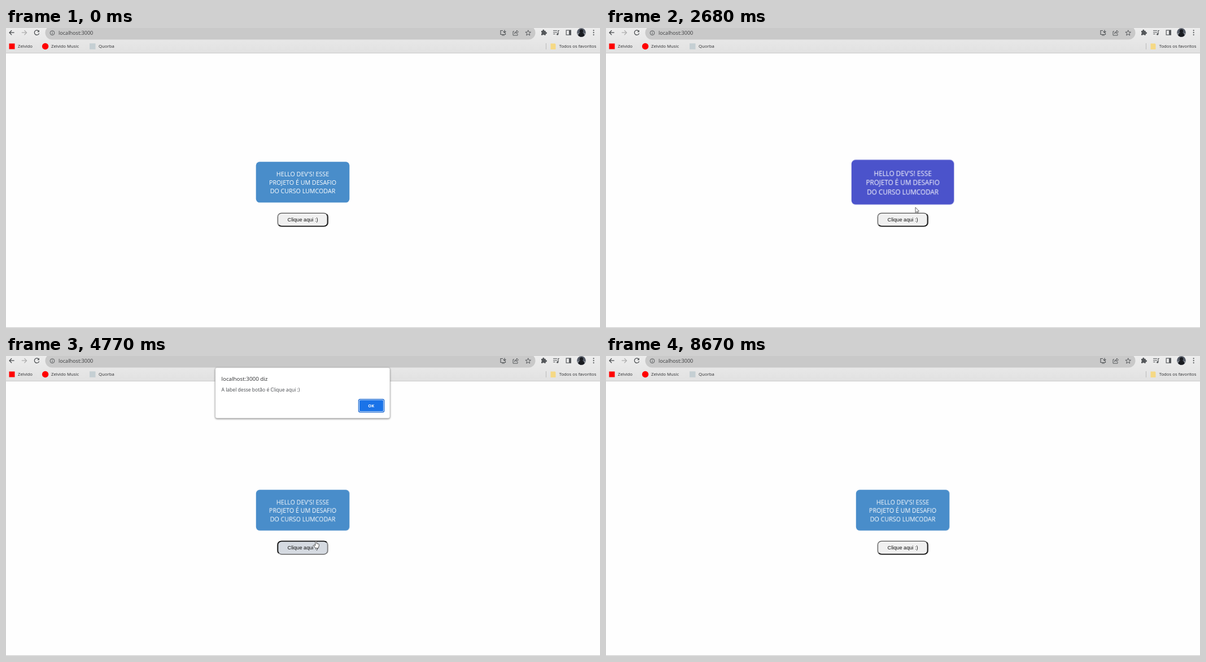
An HTML page for the animation above (9.62 s loop, 1052 by 532 pixels).

```html
<!DOCTYPE html>
<html lang="pt-BR">
<head>
<meta charset="utf-8">
<title>Clique aqui</title>
<style>
  html, body { margin: 0; width: 100%; height: 100%; overflow: hidden; background: #fefefe; }
  svg { display: block; width: 100%; height: 100%; }
  text { font-family: "Open Sans", "Noto Sans", sans-serif; fill: #2b2c2e; }

  .icon { fill: none; stroke: #55585b; stroke-width: 1.2; }
  .solid { fill: #55585b; stroke: none; }
  .bookmark { font-size: 7.75px; }
  .url { font-size: 9.1px; fill: #3b3c3e; }

  .card text { font-size: 10.7px; fill: #fff; text-anchor: middle; }
  .button text { font: 9.17px "Liberation Sans", Arial, sans-serif; fill: #111; text-anchor: middle; }
  .title { font-size: 9.84px; }
  .message { font-size: 8.59px; fill: #45484c; }
  .ok { font-size: 7.4px; font-weight: 700; fill: #fff; text-anchor: middle; }
  .box { filter: drop-shadow(0 1px 1.6px rgba(0, 0, 0, .5)); }

  /* Every animation shares one 9.62 s loop. */
  .card, .card rect, .face, .edge, .dialog, .ring, .pointer, .arrow, .beam, .hand, .spot {
    animation: 9.62s linear infinite;
  }
  .card { transform-origin: 525.5px 273.4px; animation-name: grow; }
  .card rect { animation-name: tint; }
  .face { animation-name: face; }
  .edge { animation-name: press; animation-timing-function: step-end; }
  .dialog { animation-name: dialog; }
  .ring { animation-name: ring; animation-timing-function: step-end; }
  .pointer { animation-name: travel; }
  .arrow { animation-name: arrow; animation-timing-function: step-end; }
  .beam { animation-name: beam; animation-timing-function: step-end; }
  .hand { animation-name: hand; animation-timing-function: step-end; }
  .spot { animation-name: spot; animation-timing-function: step-end; }

  @keyframes grow {
    0%, 30.3%, 100% { transform: scale(1); }
    13.88% { transform: scale(1); animation-timing-function: ease; }
    16.48% { transform: scale(1.1); }
    27.75% { transform: scale(1.1); animation-timing-function: ease; }
  }
  @keyframes tint {
    0%, 30.3%, 100% { fill: #498dca; }
    13.88% { fill: #498dca; animation-timing-function: ease; }
    16.48% { fill: #4b51cb; }
    27.75% { fill: #4b51cb; animation-timing-function: ease; }
  }
  @keyframes face {
    0%, 29.9% { fill: #f0f0f0; }
    33.06%, 65.8% { fill: #d5dae1; }
    68.9%, 100% { fill: #f0f0f0; }
  }
  @keyframes press {
    0% { transform: none; }
    40.64% { transform: rotate(180deg); }
    65.5% { transform: none; }
  }
  @keyframes dialog {
    0%, 43.44% { opacity: 0; transform: translateY(-3px); }
    43.45% { opacity: .4; transform: translateY(-3px); }
    44.8%, 65.28% { opacity: 1; transform: none; }
    66.01%, 66.5% { opacity: 1; transform: translateY(-2.5px); }
    68.4%, 100% { opacity: 0; transform: translateY(-6px); }
  }
  @keyframes ring {
    0% { opacity: 1; }
    65.2% { opacity: 0; }
  }
  @keyframes travel {
    0% { transform: translate(965px, 471px); }
    4.05% { transform: translate(965px, 471px); animation-timing-function: cubic-bezier(.35, 0, .5, 1); }
    13.88% { transform: translate(597px, 285px); }
    15.28% { transform: translate(590px, 282px); }
    17.26%, 22.25% { transform: translate(580px, 283px); }
    27.86% { transform: translate(548px, 318px); }
    31.6%, 49.4% { transform: translate(540px, 339px); }
    49.58% { transform: translate(549px, 328px); animation-timing-function: ease-in-out; }
    58.94% { transform: translate(650px, 86px); }
    59.67%, 63.7% { transform: translate(653px, 87px); }
    63.83%, 70.9% { transform: translate(644.5px, 87.5px); }
    71% { transform: translate(645px, 88px); animation-timing-function: ease-in-out; }
    80.98% { transform: translate(989px, 462px); }
    85.34%, 88.77% { transform: translate(1018px, 523px); }
    90.12%, 100% { transform: translate(1020px, 534px); }
  }
  @keyframes arrow {
    0% { opacity: 0; }
    4.05% { opacity: 1; }
    13.88% { opacity: 0; }
    26% { opacity: 1; }
    29.9% { opacity: 0; }
    51% { opacity: 1; }
    90.12%, 100% { opacity: 0; }
  }
  @keyframes beam {
    0% { opacity: 0; }
    13.88% { opacity: 1; }
    26%, 100% { opacity: 0; }
  }
  @keyframes hand {
    0% { opacity: 0; }
    29.9% { opacity: 1; }
    51%, 100% { opacity: 0; }
  }
  @keyframes spot {
    0% { opacity: 0; }
    40.64% { opacity: .8; }
    43.9% { opacity: 0; }
    63.83% { opacity: .8; }
    65.4%, 100% { opacity: 0; }
  }
</style>
</head>
<body>
<svg viewBox="0 0 1052 532">
  <defs>
    <linearGradient id="bar" x2="0" y2="1">
      <stop stop-color="#ededed"/>
      <stop offset="1" stop-color="#e1e1e1"/>
    </linearGradient>
    <clipPath id="round"><circle cx="1019" cy="8" r="7.8"/></clipPath>
  </defs>

  <rect width="1052" height="532" fill="#fefefe"/>
  <path d="M0 531.3H1052" stroke="#c6c6c6"/>

  <!-- Browser bars -->
  <rect width="1052" height="45" fill="url(#bar)"/>
  <path d="M0 44.5H1052" stroke="#cbcbcb"/>
  <rect x="69.5" y="-4" width="868" height="24.5" rx="12" fill="#c9c9c9"/>

  <g class="icon">
    <path d="M14.6 8.2H6.2M10.1 4.2L6 8.2L10.1 12.2" stroke="#45484b"/>
    <path d="M27.8 8.2H36.4M32.5 4.2L36.6 8.2L32.5 12.2" stroke="#adadad"/>
    <path d="M57.9 5.6A4.2 4.2 0 1 0 58.6 9.3" stroke="#45484b"/>
    <path d="M59 3.5V7.3H55.2Z" class="solid"/>
    <circle cx="82" cy="8.7" r="3.9" stroke-width="1"/>
    <path d="M82 8.1V11M82 6.2V7.2" stroke-width="1"/>

    <path d="M880 4.5H876V11.5H884.5V9M878 13H883M883 3.5V8M880.6 6L883 8.4L885.4 6"/>
    <path d="M900 6H898V13H906V10.5M900.5 10Q901 6.5 904.5 6.2V4L907.5 7L904.5 9.8V8Q902 8 900.5 10Z" stroke-width="1"/>
    <path d="M924.7 3.8L926 7.1L929.5 7.3L926.8 9.5L927.7 13L924.7 11.1L921.7 13L922.6 9.5L919.9 7.3L923.4 7.1Z" stroke-width="1"/>
    <path d="M948 5H950.3A1.6 1.6 0 1 1 953.3 5H955.8V7.4A1.6 1.6 0 1 1 955.8 10.3V12.8H953.3A1.6 1.6 0 0 0 950.3 12.8H948V10.3A1.5 1.5 0 0 0 948 7.5Z" class="solid"/>
    <path d="M969 4.5H976M969 7.5H976M969 10.5H973M978 11V4.5H980"/>
    <circle cx="976.7" cy="11" r="1.7" class="solid"/>
    <rect x="992.2" y="4" width="8.2" height="8.2"/>
    <path d="M997 4H1000.5V12H997Z" class="solid"/>
    <g class="solid">
      <circle cx="1040.7" cy="4.3" r="1.1"/>
      <circle cx="1040.7" cy="8.2" r="1.1"/>
      <circle cx="1040.7" cy="12.1" r="1.1"/>
    </g>
  </g>
  <g clip-path="url(#round)">
    <rect x="1011" width="16" height="16" fill="#555b66"/>
    <rect x="1011" y="9" width="16" height="8" fill="#8b9098"/>
    <circle cx="1019" cy="5.5" r="3.2" fill="#191b20"/>
    <ellipse cx="1019" cy="13" rx="5.5" ry="5" fill="#191b20"/>
  </g>
  <text class="url" x="93" y="12">localhost:3000</text>

  <rect x="5.5" y="27.5" width="10" height="10" fill="#f00"/>
  <circle cx="69.6" cy="32.5" r="5.7" fill="#f00"/>
  <rect x="148" y="27.3" width="10.5" height="10.5" fill="#c5cfd3"/>
  <g class="bookmark">
    <text class="bookmark" x="21" y="35.3">Zelvido</text>
    <text class="bookmark" x="80" y="35.3">Zelvido Music</text>
    <text class="bookmark" x="164" y="35.3">Quorba</text>
    <text class="bookmark" x="979.7" y="35.3">Todos os favoritos</text>
  </g>
  <path d="M956.5 27V38" stroke="#bababa"/>
  <path d="M964.5 27.5H972.5L973.5 29V38H964.5Z" fill="#f5d985"/>

  <!-- Page -->
  <g class="card">
    <rect x="442.7" y="237.3" width="165.6" height="72.3" rx="6.5"/>
    <text x="525.5" y="263">HELLO DEV'S! ESSE</text>
    <text x="525.5" y="278">PROJETO É UM DESAFIO</text>
    <text x="525.5" y="293">DO CURSO LUMCODAR</text>
  </g>
  <g class="button" transform="translate(525.5 340)">
    <rect class="face" x="-44.3" y="-11.55" width="88.6" height="23.1" rx="6.5" stroke="#4c4c4c" stroke-width="1.3"/>
    <path class="edge" d="M-42.4 9.65A6.5 6.5 0 0 0 -37.8 11.55H37.8A6.5 6.5 0 0 0 44.3 5.05V-5.05A6.5 6.5 0 0 0 42.4 -9.65" fill="none" stroke="#000" stroke-width="1.5"/>
    <text y="2.8">Clique aqui :)</text>
  </g>

  <g class="dialog">
    <rect class="box" x="370.7" y="20.7" width="309.2" height="89.6" rx="3" fill="#fff" stroke="#c4c4c4" stroke-width=".6"/>
    <text class="title" x="381.5" y="43.6">localhost:3000 diz</text>
    <text class="message" x="381.5" y="62.9">A label desse botão é Clique aqui :)</text>
    <rect x="625" y="77.3" width="44.2" height="21.8" rx="2.5" fill="#1a73e8"/>
    <g class="ring" fill="none">
      <rect x="625.4" y="77.7" width="43.4" height="21" rx="2.5" stroke="#fff"/>
      <rect x="624.4" y="76.7" width="45.4" height="23" rx="3" stroke="#1a67cf" stroke-width="1.2"/>
    </g>
    <text class="ok" x="646.7" y="90.9">OK</text>
  </g>

  <g class="pointer">
    <circle class="spot" cy="2" r="8" fill="#f2e01c"/>
    <path class="arrow" d="M0 0V9.3L2.2 7.4L3.7 10.7L5.1 10.1L3.7 6.9H6.6Z" fill="#fff" stroke="#222" stroke-width=".7"/>
    <path class="beam" d="M-1.5 -4.5H1.5M0 -4.5V4.5M-1.5 4.5H1.5" fill="none" stroke="#a9abb8" stroke-width=".9"/>
    <path class="hand" d="M-1.1 .7Q0 -.8 1.1 .7V4.6L4.4 5.3Q5.6 5.7 5.5 7.2L4.3 12.8H-1L-3.9 8.2Q-4 6.5 -2.6 7L-1.1 8.2Z" fill="#fff" stroke="#222" stroke-width=".8"/>
  </g>
</svg>
</body>
</html>
```
